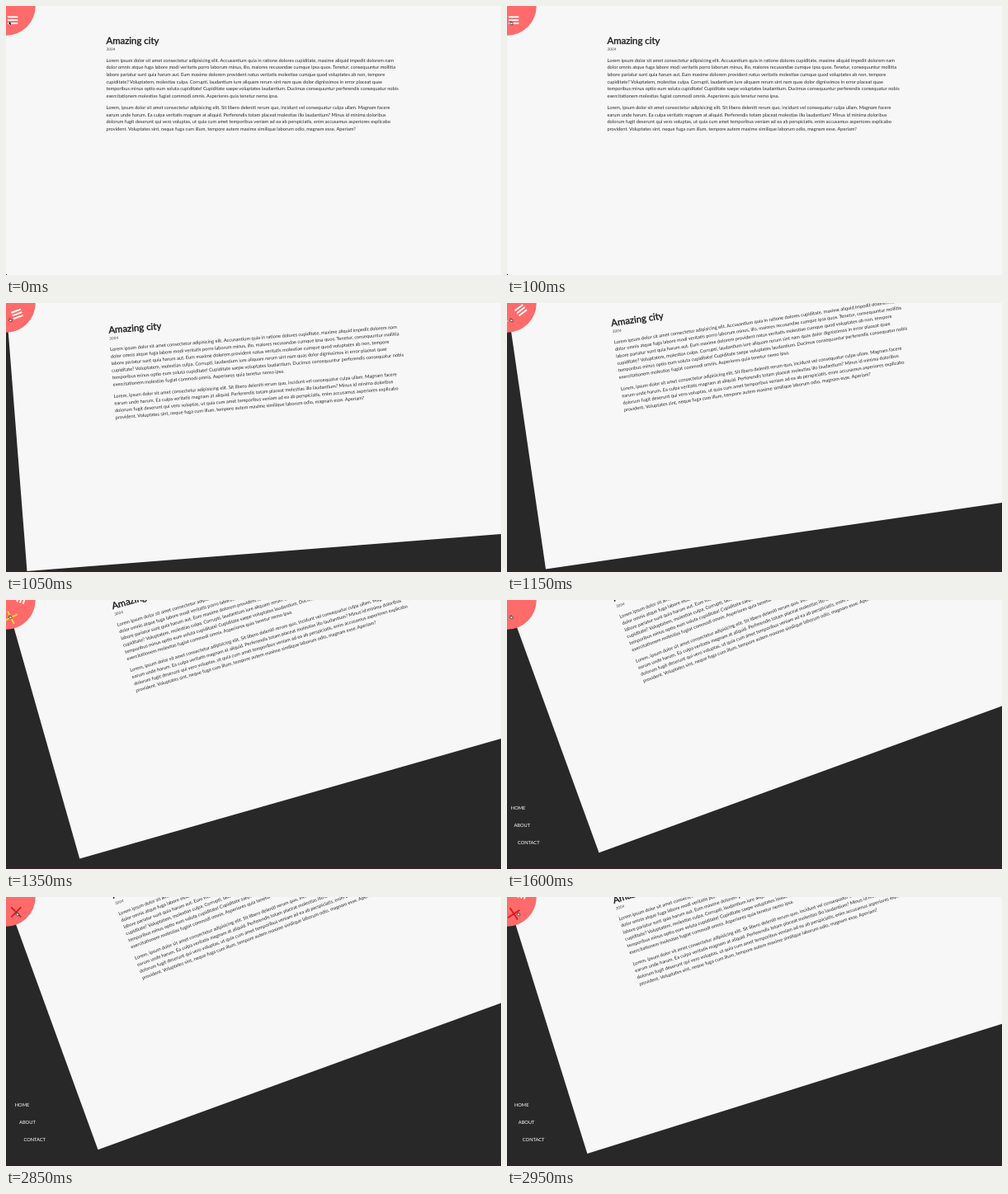
An HTML page with a canvas for the animation above (3000 ms loop, 600 by 326 pixels).

```html
<!DOCTYPE html>
<html lang="en">
<head>
<meta charset="utf-8">
<title>Rotating navigation</title>
<style>
  html, body { margin: 0; width: 100%; height: 100%; overflow: hidden; background: #282828; }
  canvas { display: block; width: 600px; height: 326px; }
</style>
</head>
<body>
<canvas id="stage"></canvas>
<script>
const W = 600, H = 326, LOOP = 3000, STEP = 50;
const OPEN_AT = 932, CLOSE_AT = 2881, TURN_MS = 526;
const NAV_AT = 1239, NAV_MS = 400;
const FLIP_AT = 1450, FLIP_MS = 300;
const UNIT = 600 / 1680; // one layout pixel on the stage
const EM = 16 * UNIT, LEFT = 340 * UNIT;

const paragraphs = [
  ["Lorem ipsum dolor sit amet consectetur adipisicing elit. Accusantium quia in ratione dolores cupiditate, maxime aliquid impedit dolorem nam",
   "dolor omnis atque fuga labore modi veritatis porro laborum minus, illo, maiores recusandae cumque ipsa quos. Tenetur, consequuntur mollitia",
   "labore pariatur sunt quia harum aut. Eum maxime dolorem provident natus veritatis molestiae cumque quod voluptates ab non, tempore",
   "cupiditate? Voluptatem, molestias culpa. Corrupti, laudantium iure aliquam rerum sint nam quas dolor dignissimos in error placeat quae",
   "temporibus minus optio eum soluta cupiditate! Cupiditate saepe voluptates laudantium. Ducimus consequuntur perferendis consequatur nobis",
   "exercitationem molestias fugiat commodi omnis. Asperiores quia tenetur nemo ipsa."],
  ["Lorem, ipsum dolor sit amet consectetur adipisicing elit. Sit libero deleniti rerum quo, incidunt vel consequatur culpa ullam. Magnam facere",
   "earum unde harum. Ea culpa veritatis magnam at aliquid. Perferendis totam placeat molestias illo laudantium? Minus id minima doloribus",
   "dolorum fugit deserunt qui vero voluptas, ut quia cum amet temporibus veniam ad ea ab perspiciatis, enim accusamus asperiores explicabo",
   "provident. Voluptates sint, neque fuga cum illum, tempore autem maxime similique laborum odio, magnam esse. Aperiam?"]
];
const menu = ["HOME", "ABOUT", "CONTACT"];

const canvas = document.getElementById("stage");
const ctx = canvas.getContext("2d");
const ratio = window.devicePixelRatio || 1;
canvas.width = W * ratio;
canvas.height = H * ratio;

const clamp = v => Math.min(1, Math.max(0, v));
const ramp = (t, start, length) => clamp((t - start) / length);
const mix = (a, b, p) => a + (b - a) * p;
const rad = degrees => degrees * Math.PI / 180;

// cubic-bezier(.42, 0, 1, 1)
function easeIn(x) {
  let low = 0, high = 1;
  for (let i = 0; i < 24; i++) {
    const s = (low + high) / 2;
    const at = 1.26 * s * (1 - s) ** 2 + 3 * s * s * (1 - s) + s ** 3;
    if (at < x) low = s; else high = s;
  }
  return 3 * low * low - 2 * low ** 3;
}

function local(draw) {
  ctx.save();
  draw();
  ctx.restore();
}

function text(string, x, y, size, color, style = "") {
  ctx.font = `${style} ${size}px Lato, sans-serif`;
  ctx.fillStyle = color;
  ctx.fillText(string, x, y);
}

function drawPage(open) {
  ctx.rotate(rad(-20 * open));
  ctx.fillStyle = "#f7f7f7";
  ctx.fillRect(0, 0, W, H);
  text("Amazing city", LEFT, 46.3, 2 * EM, "#1c1c1c");
  ctx.lineWidth = 0.36;
  ctx.strokeStyle = "#1c1c1c";
  ctx.strokeText("Amazing city", LEFT, 46.3);
  text("3004", LEFT, 54.4, EM * 5 / 6, "#444", "italic");
  let y = 67.8;
  for (const lines of paragraphs) {
    for (const line of lines) {
      text(line, LEFT, y, EM, "#2a2a2a");
      y += 1.5 * EM;
    }
    y += EM;
  }
}

function drawMenu(shown) {
  const widest = 27 + 30 * UNIT;
  menu.forEach((label, i) => {
    const indent = 15 * UNIT * i;
    const hidden = (1 + i / 2) * (widest - indent);
    const x = 30 * UNIT + indent - hidden * (1 - shown);
    text(label, x, 253.9 + 21.15 * i, EM, "#fff");
  });
}

function drawCircle(open, flip) {
  ctx.fillStyle = "#ff6b6b";
  ctx.beginPath();
  ctx.arc(0, 0, 100 * UNIT, 0, 2 * Math.PI);
  ctx.fill();
  local(() => {
    ctx.rotate(rad(-90 * open));
    ctx.fillStyle = "#fff";
    for (let i = -1; i <= 1; i++) ctx.fillRect(2, 16.2 + 3.9 * i, 12.2, 1.9);
  });
  local(() => {
    ctx.rotate(rad(90 * (1 - open)));
    ctx.translate(12.3, 18.3);
    ctx.scale(Math.max(0.08, Math.abs(Math.cos(Math.PI * flip))), 1);
    ctx.strokeStyle = `rgb(${mix(255, 222, flip)}, ${mix(222, 20, flip)}, ${mix(40, 32, flip)})`;
    ctx.lineWidth = 1.7;
    ctx.beginPath();
    for (const side of [-1, 1]) {
      ctx.moveTo(-6 * side, -6);
      ctx.lineTo(6 * side, 6);
    }
    ctx.stroke();
  });
}

function drawCursor(t) {
  ctx.translate(mix(3.6, 12.2, ramp(t, 2000, 400)), 18.4);
  ctx.lineWidth = 0.7;
  ctx.lineJoin = "round";
  const pointing = t >= 100;
  const shape = pointing
    ? [[0.6, 0.4], [1.6, 0.4], [1.8, 1.6], [3.6, 2], [3.4, 4.2], [1.2, 4.4], [-0.4, 2.6], [0.6, 2.4]]
    : [[0, 0], [0, 4.2], [1, 3.3], [1.8, 4.9], [2.5, 4.5], [1.8, 3], [3.1, 3]];
  ctx.beginPath();
  shape.forEach(point => ctx.lineTo(...point));
  ctx.closePath();
  ctx.fillStyle = pointing ? "#fff" : "#111";
  ctx.strokeStyle = pointing ? "#222" : "#fff";
  if (!pointing) ctx.stroke();
  ctx.fill();
  if (pointing) ctx.stroke();
}

function render(now) {
  const t = Math.floor((now % LOOP) / STEP) * STEP;
  const open = ramp(t, OPEN_AT, TURN_MS) - ramp(t, CLOSE_AT, TURN_MS);
  const shown = easeIn(ramp(t, NAV_AT, NAV_MS)) - easeIn(ramp(t, CLOSE_AT, NAV_MS));
  ctx.setTransform(ratio, 0, 0, ratio, 0, 0);
  ctx.textRendering = "geometricPrecision";
  ctx.fillStyle = "#282828";
  ctx.fillRect(0, 0, W, H);
  ctx.fillStyle = "#30232a";
  ctx.fillRect(0, 323, W, 3);
  local(() => drawPage(open));
  local(() => drawMenu(shown));
  local(() => drawCircle(open, ramp(t, FLIP_AT, FLIP_MS)));
  local(() => drawCursor(t));
  ctx.fillStyle = "#222";
  ctx.fillRect(0, 325, 1, 1);
}

const started = performance.now();
function tick() {
  render(performance.now() - started);
  requestAnimationFrame(tick);
}
tick();
</script>
</body>
</html>
```
